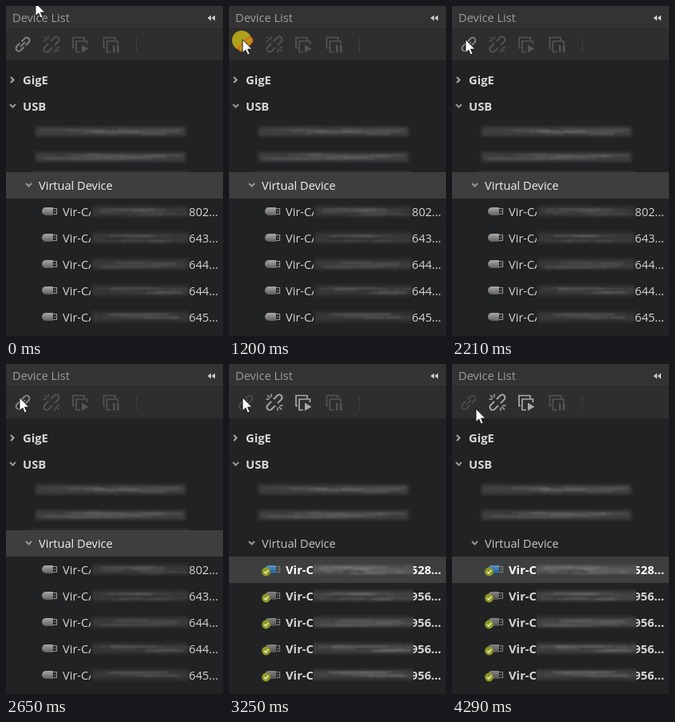
An HTML page with a canvas for the animation above (4370 ms loop, 272 by 413 pixels).

```html
<!DOCTYPE html>
<html lang="en">
<head>
<meta charset="utf-8">
<title>Device List</title>
<style>
html, body { margin: 0; width: 272px; height: 413px; overflow: hidden; background: #212222; }
canvas { display: block; }
</style>
</head>
<body>
<canvas id="stage" width="272" height="413"></canvas>
<script>
const ctx = document.getElementById('stage').getContext('2d');
const LOOP = 4370, STEP = LOOP / 64;
const HOVER = 480, CLICK = 1140, RELEASE = 1340, CONNECTED = 2780;
const FAMILY = '"Open Sans", "Noto Sans", sans-serif';
// time, x, y of the pointer tip
const POINTER = [[0, 37, -4], [600, 18, 38], [680, 18, 38], [900, 17, 42],
  [4030, 17, 42], [4110, 17, 44], [4290, 30, 56], [LOOP, 30, 56]];

function random(seed) {
  return () => {
    seed = (seed * 1664525 + 1013904223) >>> 0;
    return seed / 4294967296;
  };
}

function rect(x, y, w, h, color) {
  ctx.fillStyle = color;
  ctx.fillRect(x, y, w, h);
}

function disc(x, y, r, color) {
  ctx.fillStyle = color;
  ctx.beginPath();
  ctx.arc(x, y, r, 0, 7);
  ctx.fill();
}

function text(str, x, y, color, bold, align = 'left') {
  ctx.font = (bold ? 'bold 14.8px ' : '14.6px ') + FAMILY;
  ctx.textAlign = align;
  ctx.fillStyle = color;
  ctx.fillText(str, x, y);
}

function stroke(d, color, width = 2, x = 0, y = 0, angle = 0) {
  ctx.save();
  ctx.translate(x, y);
  ctx.rotate(angle);
  ctx.strokeStyle = color;
  ctx.lineWidth = width;
  ctx.stroke(new Path2D(d));
  ctx.restore();
}

function fill(d, color, x = 0, y = 0) {
  ctx.save();
  ctx.translate(x, y);
  ctx.fillStyle = color;
  ctx.fill(new Path2D(d));
  ctx.restore();
}

// Blurred grey streaks that shimmer a little with every step;
// a negative inset gives hard left and right edges
function smear(x, y, w, inset, seed, step, light) {
  const shape = random(seed * 7919 + 17), flicker = random(seed * 631 + step * 9973);
  shape(); flicker();
  const grey = (tone, alpha) => `rgba(${tone},${tone},${tone},${alpha * light})`;
  const left = x + inset, width = w - 2 * inset;
  ctx.save();
  ctx.beginPath();
  ctx.rect(x, y, w, 18);
  ctx.clip();
  ctx.filter = 'blur(2px)';
  rect(left, y + 3, width, 12, grey(130, 0.32));
  ctx.filter = 'blur(0.8px)';
  for (let i = 0; i < 24; i++) {
    const len = 15 + shape() * 70;
    const sx = left + shape() * (width - len) + flicker() * 3;
    const sy = y + 4 + shape() * 8;
    rect(sx, sy, len, 1 + shape() * 3, grey(i % 3 ? 140 : 40, 0.12 + flicker() * 0.1));
  }
  ctx.restore();
}

function toolbar(t, on) {
  const link = on ? '#4b4b4b' : t >= HOVER && t < RELEASE ? '#e36a17' : '#858585';
  const active = on ? '#aaa' : '#545454';
  stroke('M-1.5 -3.5H-7a3.5 3.5 0 0 0 0 7H-1.5M1.5 -3.5H7a3.5 3.5 0 0 1 0 7H1.5M-4 0H4',
    link, 1.9, 21, 48, -Math.PI / 4);
  stroke('M-2 -3.5H-8.5a3.5 3.5 0 0 0 0 7H-2M2 -3.5H8.5a3.5 3.5 0 0 1 0 7H2',
    active, 1.9, 57, 48, -Math.PI / 4);
  stroke('M-4 -10.5V-6.5M-10.5 -4H-6.5M4 10.5V6.5M10.5 4H6.5M-9 -9L-5.5 -5.5M9 9L5.5 5.5',
    active, 1.5, 57, 48);
  const stack = 'M86 52.5H84V39.5H98V43M101.5 48V44H88V57.5H93';
  stroke(stack, active, 1.7);
  fill('M95 48.5L103.5 53.5L95 58.5Z', active);
  stroke(stack, '#545454', 1.7, 38.5);
  rect(134, 49, 2.5, 9, '#545454');
  rect(139, 49, 2.5, 9, '#545454');
  for (let y = 40; y < 57; y += 3) rect(163, y, 1, 2, '#484848');
}

function plug(y, on, selected) {
  const body = ctx.createLinearGradient(0, y - 5, 0, y + 5);
  body.addColorStop(0, selected ? '#5b94c4' : on ? '#858585' : '#a8a8a8');
  body.addColorStop(1, selected ? '#225d91' : on ? '#505050' : '#606060');
  ctx.fillStyle = body;
  ctx.beginPath();
  ctx.roundRect(45, y - 5, 14, 10, [5, 1, 1, 5]);
  ctx.fill();
  stroke('M59 -3.5H63.5V3.5H59', on ? '#808080' : '#969696', 1.2, 0, y);
  rect(60.5, y - 1, 1.5, 2, '#777');
  if (!on) return;
  disc(46.5, y + 3, 5.4, '#8f9a22');
  stroke('M44 3L46 5L49.3 1', '#eef0d8', 1.4, 0, y);
}

function pointerAt(t) {
  const i = POINTER.findIndex(p => p[0] > t);
  const [t0, x0, y0] = POINTER[i - 1], [t1, x1, y1] = POINTER[i];
  const k = (t - t0) / (t1 - t0);
  return [x0 + (x1 - x0) * k, y0 + (y1 - y0) * k];
}

function pointer(t) {
  const [x, y] = pointerAt(t).map(Math.round);
  const arrow = 'M0 0V16.5L3.8 13L6.4 19L9 17.9L6.5 12H11.8Z';
  fill(arrow, '#fff', x, y);
  stroke(arrow, '#151515', 0.9, x, y);
}

function draw(t) {
  const on = t >= CONNECTED, step = Math.floor(t / STEP);
  rect(0, 0, 272, 413, '#212223');
  rect(0, 0, 272, 29, '#333');
  rect(0, 29, 272, 39, '#2e2e2e');
  rect(0, 28, 272, 1, '#272727');
  if (!on) rect(32, 205, 198, 3, '#292a2a');
  rect(0, on ? 241 : 208, 272, 33, '#3d3f3f');

  text('Device List', 8, 20, '#9c9c9c');
  fill('M257 11.5V18.5L252.5 15ZM262 11.5V18.5L257.5 15Z', '#ccc');
  if (t >= CLICK && t < RELEASE) disc(16, 43, 12.2, '#ada01a');
  toolbar(t, on);

  stroke('M6 89L9.5 92.5L6 96', '#aaa');
  const open = 'M-3.5 -2L0 1.5L3.5 -2';
  stroke(open, '#999', 2, 8.5, 125);
  stroke(open, '#999', 2, 28.5, 224);
  text('GigE', 21, 98, '#d8d8d8', true);
  text('USB', 21, 131, '#d8d8d8', true);
  text('Virtual Device', 41, 230, on ? '#c6c6c6' : '#f0f0f0');
  smear(34, 148, 194, 3, 1, step, 0.95);
  smear(34, 180, 194, 3, 2, step, 0.95);

  const ids = on ? ['528', '956', '956', '956', '956'] : ['802', '643', '644', '644', '645'];
  ids.forEach((id, i) => {
    const y = 257 + i * 33, selected = on && !i;
    const color = selected ? '#fff' : '#d6d6d6';
    plug(y, on, selected);
    text(on ? 'Vir-C' : 'Vir-CA', 71, y + 6, color, on);
    text(id + '...', 266, y + 6, color, on, 'right');
    rect(106, y - 9, on ? 125 : 124, 18, selected ? '#383a3a' : '#232425');
    smear(106, y - 9, 125, on ? -4 : 2, i + 3, step, selected ? 1.3 : on ? 0.95 : 0.65);
  });

  pointer(t);
}

function tick(now) {
  draw(now % LOOP);
  requestAnimationFrame(tick);
}
draw(0);
requestAnimationFrame(tick);
</script>
</body>
</html>
```
